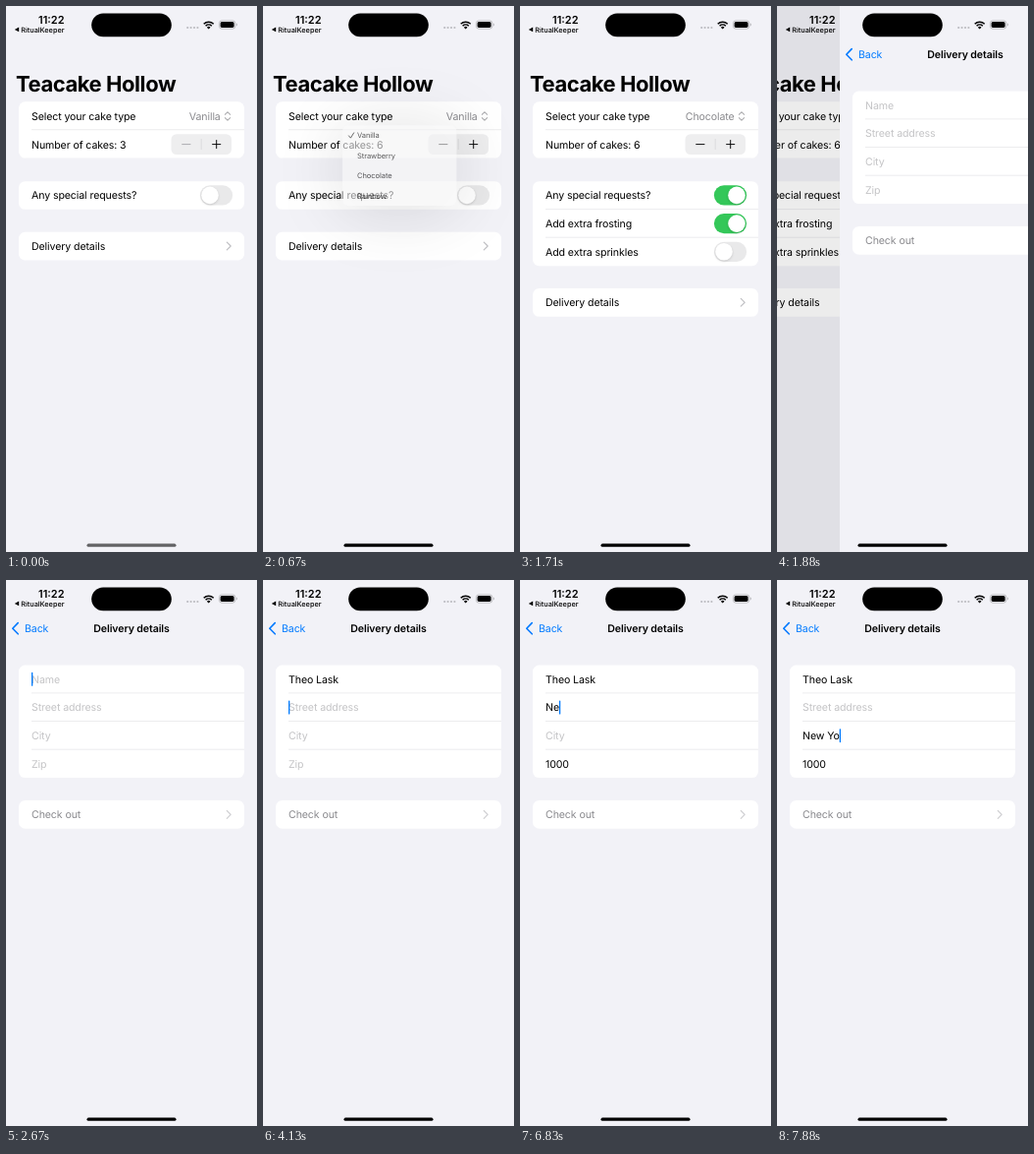
An HTML page for the animation above (8 s loop, 256 px wide and 555 px high).

```html
<!DOCTYPE html>
<html lang="en">
<head>
<meta charset="utf-8">
<title>Cake order form</title>
<style>
  html, body { margin: 0; width: 100%; height: 100%; overflow: hidden; background: #f2f2f7; }
  svg { display: block; width: 100vw; height: 100vh; }
  text {
    font: 10.6px Inter, "Liberation Sans", sans-serif; letter-spacing: -.01em;
    white-space: pre; text-rendering: geometricPrecision;
  }
  .title { font-size: 22px; font-weight: 700; letter-spacing: -.02em; }
  .semi { font-weight: 600; }
  .clock { font-size: 11px; font-weight: 600; letter-spacing: 0; }
  .small { font-size: 7.3px; font-weight: 500; letter-spacing: 0; }
  .grey { fill: #8a8a8e; }
  .empty { fill: #c4c4c6; }
  .blue { fill: #007aff; }
  .card { fill: #fff; }
  .line { stroke: #e0e0e3; stroke-width: .6; }
  .stroke { fill: none; stroke-linecap: round; stroke-linejoin: round; }
  .knob { fill: #fff; filter: drop-shadow(0 1px 1px rgba(0,0,0,.15)); }
  #panel { filter: drop-shadow(0 6px 50px rgba(0,0,0,.22)); }
</style>
</head>
<body>
<svg viewBox="0 0 256 555" preserveAspectRatio="none">
  <defs>
    <path id="chevron" class="stroke" d="M0-3.9 3.9 0 0 3.9" stroke="#bfbfc3" stroke-width="1.2"/>
  </defs>

  <g id="order">
    <rect width="256" height="555" fill="#f2f2f7"/>
    <text class="title" x="10" y="87">Teacake Hollow</text>

    <rect class="card" x="13" y="97.3" width="230" height="57.3" rx="6.5"/>
    <path class="line" d="M26 125.7H243"/>
    <text x="26" y="116">Select your cake type</text>
    <text id="flavour" class="grey" x="218.7" y="116" text-anchor="end"></text>
    <path class="stroke" d="M223.3 110.3 226 107.7 228.7 110.3M223.3 113.7 226 116.3 228.7 113.7" stroke="#8a8a8e" stroke-width="1"/>
    <text id="count" x="26" y="144.6"></text>
    <rect x="168.5" y="130.2" width="61.5" height="20.8" rx="5.5" fill="#eeeeef"/>
    <path d="M199.2 135V146" stroke="#d4d4d7" stroke-width=".7"/>
    <path id="minus" class="stroke" d="M179.7 140.6H188" stroke-width=".95"/>
    <path class="stroke" d="M210.6 140.6H218.8M214.7 136.5V144.7" stroke="#000" stroke-width=".95"/>

    <rect id="requests" class="card" x="13" y="178.2" width="230" rx="6.5"/>
    <text x="26" y="196.4">Any special requests?</text>
    <g id="extras">
      <path class="line" d="M26 206.6H243M26 235.2H243"/>
      <text x="26" y="225">Add extra frosting</text>
      <text x="26" y="253.7">Add extra sprinkles</text>
    </g>

    <g id="delivery">
      <rect class="card" x="13" y="229.8" width="230" height="28.7" rx="6.5"/>
      <text x="26" y="248">Delivery details</text>
      <use href="#chevron" x="225.3" y="244"/>
    </g>

    <g id="menu">
      <rect id="panel" x="54" y="132" width="163.4" rx="8" fill="#f5f5f6" fill-opacity=".95"/>
      <rect id="pressed" x="54" y="189.3" width="163.4" height="28.65" fill="#dededf"/>
      <path class="stroke" d="M63 146.8 65.7 150 70.3 142.6" stroke="#000" stroke-width="1.3"/>
    </g>
  </g>

  <rect id="dim" width="256" height="555"/>

  <g id="details">
    <rect width="256" height="555" fill="#f2f2f7"/>
    <path class="stroke" d="M12.2 43.6 6.8 49.2 12.2 54.8" stroke="#007aff" stroke-width="1.6"/>
    <text class="blue" x="19" y="53.2">Back</text>
    <text class="semi" x="128" y="53.2" text-anchor="middle">Delivery details</text>
    <rect class="card" x="13" y="86.5" width="230" height="114.6" rx="6.5"/>
    <path class="line" d="M26 114.9H243M26 143.5H243M26 172.2H243"/>
    <g id="fields"></g>
    <rect id="cursor" class="blue" width="1.3" height="14" rx=".6"/>
    <rect class="card" x="13" y="224" width="230" height="28.7" rx="6.5"/>
    <text class="grey" x="26" y="242.4">Check out</text>
    <use href="#chevron" x="225.3" y="238.4" opacity=".75"/>
  </g>

  <g id="status">
    <text class="clock" x="33" y="18.4">11:22</text>
    <path d="M8.8 23.9 13.2 21.6V26.2Z"/>
    <text class="small" x="15.2" y="26.6">RitualKeeper</text>
    <rect x="87.2" y="7.4" width="81.6" height="23.9" rx="11.95"/>
    <path class="stroke" d="M185.2 22H196" stroke="#bcbcc1" stroke-width="2.2" stroke-dasharray="0 3.4"/>
    <path d="M201.7 18.2A7.1 7.1 0 0 1 211.7 18.2M203.6 20.2A4.4 4.4 0 0 1 209.8 20.2" fill="none" stroke="#000" stroke-width="1.5"/>
    <path d="M206.7 23.5 204.9 21.7A2.6 2.6 0 0 1 208.5 21.7Z"/>
    <rect x="217.4" y="14.9" width="16.4" height="8.2" rx="2.6" fill="none" stroke="#a6a6aa" stroke-width=".7"/>
    <rect x="218.6" y="16.1" width="14" height="5.8" rx="1.6"/>
    <path d="M234.9 17.6A1.6 1.6 0 0 1 234.9 20.4Z" fill="#a6a6aa"/>
    <rect id="home" x="82.5" y="546.5" width="91" height="3.3" rx="1.65"/>
  </g>
</svg>

<script>
const LOOP = 8000, TICK = 1000 / 24, ROW = 28.65;
const $ = id => document.getElementById(id);
const set = (node, attrs) => {
  for (const key in attrs) node.setAttribute(key, attrs[key]);
  return node;
};
const add = (parent, tag, attrs, content = '') => {
  const node = set(document.createElementNS('http://www.w3.org/2000/svg', tag), attrs);
  node.textContent = content;
  return parent.appendChild(node);
};
const mix = (a, b, p) => a + (b - a) * p;

// Eased progress that advances in whole ticks, starting at `start`.
const ramp = (t, start, ticks) => {
  const step = Math.floor((t - start) / TICK + .1) + 1;
  const p = Math.min(1, Math.max(0, step / ticks));
  return 1 - (1 - p) ** 2;
};

const makeToggle = y => {
  const group = add($('order'), 'g', {});
  const track = add(group, 'rect', { x: 197.9, y: y - 10.1, width: 33.2, height: 20.2, rx: 10.1 });
  const knob = add(group, 'circle', { class: 'knob', cy: y, r: 8.8 });
  return (p, opacity = 1) => {
    const rgb = [[233, 52], [233, 199], [234, 89]].map(([a, b]) => mix(a, b, p));
    set(track, { fill: `rgb(${rgb})` });
    set(knob, { cx: mix(208, 221, p) });
    set(group, { opacity });
  };
};
const [toggleRequests, toggleFrosting, toggleSprinkles] = [192.4, 221.1, 249.8].map(makeToggle);
$('order').append($('menu'));

['Vanilla', 'Strawberry', 'Chocolate', 'Rainbow'].forEach((name, i) =>
  add($('menu'), 'text', { x: 75, y: 132 + ROW * (i + .5) + 4 }, name));

const hints = ['Name', 'Street address', 'City', 'Zip'];
const rowY = i => 86.5 + ROW * (i + .5);
const inputs = hints.map((hint, i) => add($('fields'), 'text', { x: 26, y: rowY(i) + 4 }));

// Entries are [time, field, text, cursor opacity].
const type = (field, text, from, times, step = 1) =>
  times.map((time, i) => [time, field, text.slice(0, from + i * step)]);
const edits = [
  [2670, 0, ''],
  ...type(0, 'Theo Lask', 1, [2920, 2960, 3040, 3080, 3170, 3330, 3380, 3420, 3460]),
  [3750, 1, ''], [4000, 1, '', .5], [4040, 1, '', 0], [4080, 1, '', .5], [4130, 1, ''],
  ...type(1, 'New York', 1, [4250, 4380, 4540, 4580, 4670, 4790, 4960, 5170]),
  [5380, 2, ''], [5540, 2, '', .5], [5580, 2, '', 0], [5630, 2, '', .5], [5670, 2, ''],
  [5790, 3, ''], [5880, 3, '1'], [6040, 3, '100'], [6080, 3, '1000'],
  [6380, 1, 'New York'],
  ...type(1, 'New York', 7, [6630, 6670, 6710, 6750, 6790, 6830, 6880, 6960], -1),
  [7250, 2, ''],
  ...type(2, 'New York', 1, [7420, 7460, 7540, 7580, 7710, 7880])
];

function drawOrder(t) {
  $('flavour').textContent = t < 1040 ? 'Vanilla' : 'Chocolate';
  const cakes = 3 + [420, 500, 580].filter(time => t >= time).length;
  $('count').textContent = 'Number of cakes: ' + cakes;
  set($('minus'), { stroke: cakes > 3 ? '#000' : '#aaaaad' });
  set($('home'), { fill: t < 625 ? '#626264' : '#000' });

  const expanded = ramp(t, 1290, 4);
  set($('requests'), { height: ROW * (1 + 2 * expanded) });
  set($('extras'), { opacity: expanded });
  set($('delivery'), { transform: `translate(0 ${2 * ROW * expanded})` });
  toggleRequests(expanded);
  toggleFrosting(ramp(t, 1580, 4), expanded);
  toggleSprinkles(0, expanded);

  const closing = t >= 1040;
  const opened = ramp(t, 625, 5);
  const scale = closing ? .857 : mix(.2, 1, opened);
  set($('menu'), {
    visibility: t >= 620 && t < 1080 ? 'visible' : 'hidden',
    opacity: closing ? .83 : opened,
    transform: `translate(148 95) scale(${scale}) translate(-148 -95)`
  });
  set($('panel'), { height: closing ? 106.5 : 4 * ROW });
  set($('pressed'), { opacity: closing ? 1 : 0 });
}

function drawDetails(t) {
  const pushed = ramp(t, 1830, 4);
  set($('order'), { transform: `translate(${-77 * pushed} 0)` });
  set($('dim'), { opacity: .1 * pushed });
  set($('details'), { transform: `translate(${256 * (1 - pushed)} 0)` });

  const done = edits.filter(([time]) => t >= time);
  const values = ['', '', '', ''];
  for (const [, field, text] of done) values[field] = text;
  inputs.forEach((input, i) => {
    input.textContent = values[i] || hints[i];
    input.setAttribute('class', values[i] ? '' : 'empty');
  });

  const [, field, text, opacity = 1] = done.at(-1) || [0, 0, '', 0];
  const width = text ? inputs[field].getComputedTextLength() : 0;
  set($('cursor'), { x: 26 + width, y: rowY(field) - 7, opacity });
}

function draw() {
  const t = performance.now() % LOOP;
  drawOrder(t);
  drawDetails(t);
  requestAnimationFrame(draw);
}
draw();
</script>
</body>
</html>
```
